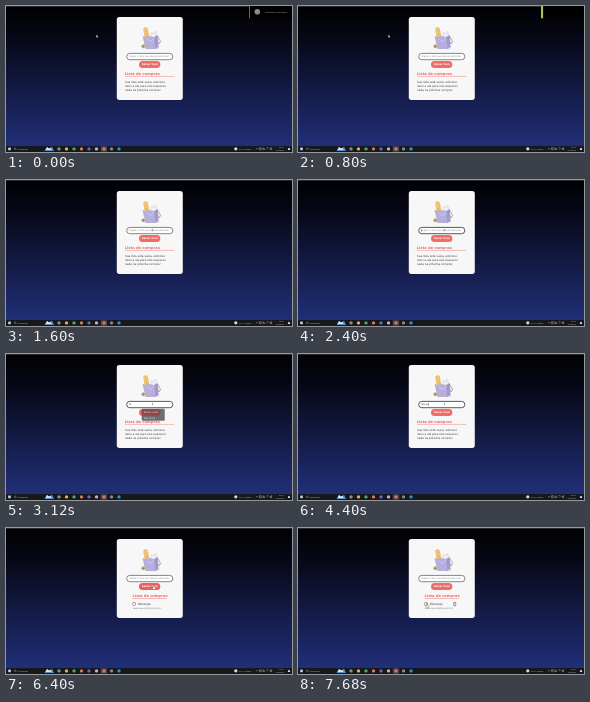
Write an HTML page that moves like this. It is 286 px wide and 146 px high and loops after 8 s.

```html
<!DOCTYPE html>
<html lang="pt-BR">
<head>
<meta charset="utf-8">
<title>Lista de compras</title>
<style>
  html, body { margin: 0; width: 100%; height: 100%; overflow: hidden; background: #000; }
  svg { display: block; width: 286px; height: 146px; font-family: "DejaVu Sans", sans-serif; }
  .ui { font-family: "Open Sans", sans-serif; fill: #c9c9cd; }
</style>
</head>
<body>
<svg viewBox="0 0 286 146">
  <defs>
    <linearGradient id="night" x2="0" y2="1">
      <stop stop-color="#010103"/>
      <stop offset=".2" stop-color="#060714"/>
      <stop offset="1" stop-color="#22317d"/>
    </linearGradient>
  </defs>
  <rect width="286" height="146" fill="url(#night)"/>
  <rect width="286" height="1" fill="#29292d"/>

  <rect id="card" x="110.8" y="11.1" width="66" rx="2.6" fill="#f7f7f7"/>

  <!-- shopping bag -->
  <g stroke-linecap="round" stroke-linejoin="round">
    <path d="M139.6 23.5L141 31" stroke="#e9bd66" stroke-width="4.6"/>
    <path d="M138.4 24.4l2-1M138.8 27l2.2-1" stroke="#f8dfa4" stroke-width=".7"/>
    <path d="M144.5 30l1-3.5 2.5 1.2 1.5-2.7 1.8 5" fill="#efedf5" stroke="#c9c4dc" stroke-width=".5"/>
    <path d="M136.5 30l3.5 1 4-1 4 1 3-1.5 1.5 11.5-3.2 2H139.5z" fill="#b5aede"/>
    <path d="M149.3 43l-1-12 2.7-1.5 1.5 11.5z" fill="#a299d1"/>
    <path d="M141.5 33q3 5 6-.5" fill="none" stroke="#dcd6f0" stroke-width=".7"/>
    <path d="M151.5 30l3.2 5.5-1.7 2.5-1.5-3z" fill="#f3e8ee" stroke="#6b6673" stroke-width=".5"/>
    <circle cx="137.3" cy="40.3" r="2" fill="#c6b36a"/>
    <circle cx="137.3" cy="40.3" r=".9" fill="#8d8363"/>
    <path d="M150.5 40.7l3 .6-2 1.7z" fill="#e2c489"/>
  </g>

  <rect id="field" x="120.7" y="47.4" width="46.1" height="6.3" rx="3.1" fill="#fff"/>
  <text id="hint" x="123.2" y="51.3" font-size="2.35" fill="#85858a">Digite o item que deseja adicionar</text>
  <text id="typed" x="123.2" y="51.3" font-size="2.2" fill="#222"></text>
  <rect id="caret" y="49.2" width=".4" height="2.6" fill="#222"/>

  <rect id="button" x="133" y="54.9" width="21.3" height="7.1" rx="3.5"/>
  <text x="143.7" y="59.4" font-size="2.5" font-weight="bold" text-anchor="middle" fill="#fff">Salvar item</text>

  <g id="empty">
    <text x="118.8" y="69.2" font-size="3.65" font-weight="bold" fill="#ee6c68">Lista de compras</text>
    <path d="M119 70.4H168.3" stroke="#f0938f" stroke-width=".6"/>
    <g font-size="2.75" fill="#37373d">
      <text x="119" y="77.1">Sua lista está vazia, adicione</text>
      <text x="119" y="81">itens a ela para não esquecer</text>
      <text x="119" y="84.9">nada na próxima compra!</text>
    </g>
  </g>

  <g id="filled">
    <text x="126.6" y="69.2" font-size="3.65" font-weight="bold" fill="#ee6c68">Lista de compras</text>
    <path d="M126.6 70.5H161" stroke="#f0938f" stroke-width=".6"/>
    <rect x="126.7" y="74.5" width="2.8" height="2.8" rx=".5" fill="#fff" stroke="#555" stroke-width=".5"/>
    <text x="131.9" y="77" font-size="2.9" fill="#333338">Morango</text>
    <text x="126.7" y="80.5" font-size="2" fill="#66666c">Sexta-feira (02/08) às 20:31</text>
    <path id="trash" d="M155.2 75.1h3M156.2 75v-.6h1V75M155.6 75.5l.2 2.3h1.8l.2-2.3" fill="none" stroke="#444" stroke-width=".5"/>
  </g>

  <g id="menu">
    <rect x="135.7" y="54.7" width="23" height="12" rx="1" fill="#656263" fill-opacity=".93"/>
    <rect x="135.7" y="55.2" width="18.4" height="6.4" rx="2" fill="#8f4547" fill-opacity=".8"/>
    <g font-size="2.4" fill="#f0dcdc">
      <text x="138" y="59.2">Maçã verde</text>
      <text x="138" y="64.8">Macarrão</text>
    </g>
  </g>

  <!-- recording notice -->
  <g id="notice">
    <rect x="243" width="43" height="12.3" fill="#010102"/>
    <g id="message">
      <circle cx="251.3" cy="5.8" r="2.8" fill="#8b8b8e"/>
      <text class="ui" x="258.5" y="6.5" font-size="2.15">A gravação foi iniciada</text>
    </g>
    <rect id="bar" x="243" height="12.3"/>
  </g>

  <!-- taskbar -->
  <rect y="140" width="286" height="6" fill="#17181c"/>
  <rect x="2.2" y="141.6" width="2.6" height="2.6" fill="#b9d9f0"/>
  <circle cx="9.2" cy="142.7" r=".8" fill="none" stroke="#bbb" stroke-width=".4"/>
  <text class="ui" x="11.5" y="143.7" font-size="2.3">Pesquisar</text>
  <g id="apps">
    <path d="M38.5 145l2.5-4 3 2 2-2.5 2 4.5z" fill="#4d8fd0"/>
    <path d="M39.5 144l1.5-3 2 1.5 1.5-1 1 2.5z" fill="#dfe5ea"/>
    <rect x="94.7" y="140.3" width="6.5" height="5.4" rx=".8" fill="#4b4548"/>
  </g>
  <g class="ui">
    <circle cx="229.8" cy="142.8" r="1.6" fill="#d5dbe6"/>
    <text x="233" y="143.6" font-size="2.3">22°C Limpo</text>
    <path d="M250 143.3l1-1.2 1 1.2M253.6 141.7h1.6v2.1h-1.6zM256.9 143.6v-1.8l1.8 1v.8zM260.3 142.2q1.2-1.2 2.4 0M261.5 143.7v-.4M264 142.3h.8l.8-.8v2.6l-.8-.8h-.8z" fill="none" stroke="#c5c5ca" stroke-width=".45"/>
    <text x="278" y="142.3" font-size="2" text-anchor="end">20:31</text>
    <text x="278" y="144.9" font-size="2" text-anchor="end">02/08/24</text>
    <path d="M281.8 144l.4-1.8q.8-1 1.6 0l.4 1.8z" fill="#d5d5da"/>
  </g>

  <!-- pointers -->
  <path id="arrow" d="M0 0V2.7L.7 2.1 1.2 3.1 1.6 2.9 1.2 1.9H2z" fill="#fff" stroke="#222" stroke-width=".2"/>
  <path id="beam" d="M-.5-.9H.5M0-.9V.9M-.5 .9H.5" fill="none" stroke="#6d6667" stroke-width=".4"/>
  <path id="hand" d="M0 0q.6-.5.8.2V1.5l1.5.4q.5.2.4.7L2.3 4H.4L-.8 2.4l.3-.4.5.3z" fill="#fff" stroke="#222" stroke-width=".3"/>
</svg>
<script>
const $ = id => document.getElementById(id);
const set = (id, attrs) => {
  for (const key in attrs) $(id).setAttribute(key, attrs[key]);
};
const show = (id, on) => set(id, { visibility: on ? "visible" : "hidden" });
const between = (t, a, b) => t >= a && t < b;
const ease = (t, a, b) => {
  const p = Math.min(1, Math.max(0, (t - a) / (b - a)));
  return p * p * (3 - 2 * p);
};

const LOOP = 8000, ADDED = 5920;
const keyTimes = [2960, 3440, 3680, 4080, 4240, 4560, 4800];

// Pointer stops: move start, move end, x, y
const stops = [
  [0, 1, 90.3, 28.8],
  [880, 1560, 146.5, 50],
  [4480, 4800, 147, 57.5],
  [6880, 7440, 128.3, 75.6]
];

["#8b8b90", "#d8b45a", "#4ba56b", "#cf7c55", "#6b62c9", "#b9b3dc", "#d07a78", "#85888e", "#318fd0"].forEach((fill, i) => {
  $("apps").insertAdjacentHTML("beforeend",
    `<circle cx="${53 + i * 7.5}" cy="142.9" r="1.7" fill="${fill}"/>`);
});

function pointerAt(t) {
  let [, , x, y] = stops[0];
  for (const [a, b, nx, ny] of stops.slice(1)) {
    const p = ease(t, a, b);
    x += (nx - x) * p;
    y += (ny - y) * p;
  }
  return [x, y];
}

function draw(t) {
  const leave = ease(t, 80, 560), exit = ease(t, 800, 1160);
  set("message", { transform: `translate(${44 * leave})` });
  set("notice", { transform: `translate(${44 * exit})` });
  set("bar", {
    width: .6 + 1.5 * leave,
    fill: leave > 0 ? "#a4c45c" : "#a9aaa8"
  });

  const added = t >= ADDED;
  const word = added ? "" : "Morango".slice(0, keyTimes.filter(k => t >= k).length);
  const focus = between(t, 2320, 5680);
  $("typed").textContent = word;
  show("hint", !word);
  set("field", { stroke: focus ? "#2e3333" : "#4c5656", "stroke-width": focus ? .8 : .7 });
  set("caret", { x: 123.4 + (word ? $("typed").getComputedTextLength() : 0) });
  show("caret", focus && (t - 2320) % 1040 < 520);
  show("menu", between(t, 2960, 3440));

  set("card", { height: added ? 78.8 : 82.8 });
  show("empty", !added);
  show("filled", added);
  show("trash", t >= 7200);

  const [x, y] = pointerAt(t);
  const onField = between(x, 121, 167) && between(y, 47.4, 53.8);
  const onButton = between(x, 133, 154.3) && between(y, 54.9, 62);
  const onItem = added && between(x, 126, 160) && y > 73;
  const kind = onField ? "beam" : onButton || onItem ? "hand" : "arrow";
  for (const id of ["arrow", "beam", "hand"]) {
    show(id, id === kind);
    set(id, { transform: `translate(${x} ${y})` });
  }
  set("button", { fill: onButton ? "#e9605c" : "#f26b66" });
}

const start = performance.now();
function tick() {
  draw((performance.now() - start) % LOOP);
  requestAnimationFrame(tick);
}
tick();
</script>
</body>
</html>
```
